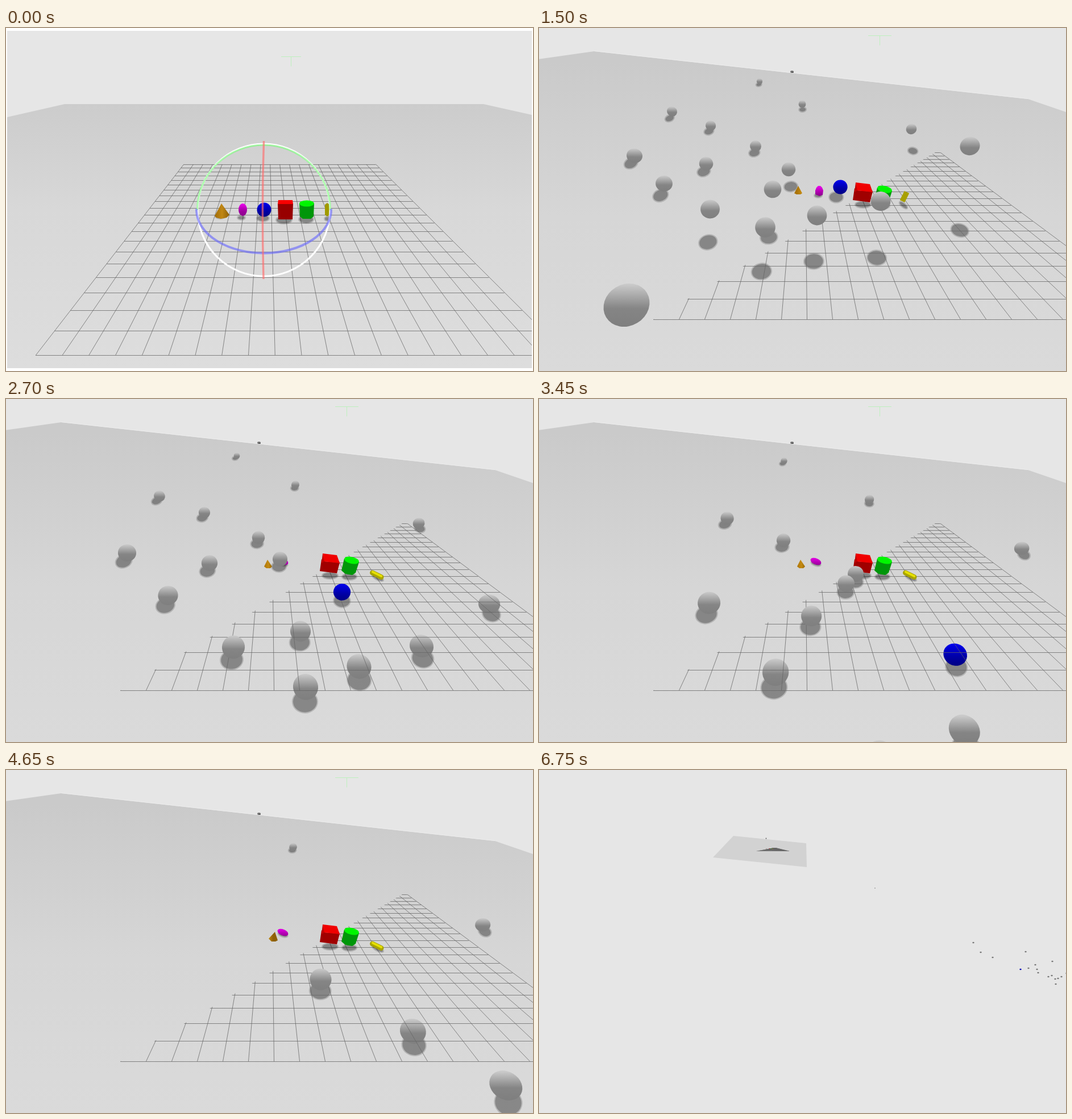
An HTML page with a canvas that plays this animation: 927x604 px, repeating every 6.9 s.

```html
<!DOCTYPE html>
<html lang="en">
<head>
<meta charset="utf-8">
<title>Rolling balls</title>
<style>
html, body { margin: 0; width: 100%; height: 100%; overflow: hidden; background: #e6e6e6; }
canvas { display: block; }
</style>
</head>
<body>
<canvas id="stage" width="927" height="604"></canvas>
<script>
const ctx = document.getElementById('stage').getContext('2d');
const LOOP = 6900, STEP = 150, SKY = '#e6e6e6';
const GRAY = ['#cacaca', '#858585', '#7f7f7f'];
const BLUE = ['#0000f0', '#0000a8', '#000084'];

// Per ball: drop point, two points on its rolling path, radius, optional deflection.
const BALLS = [
  [388, 94, 406, 100, 431, 109, 5.3],
  [463, 134, 509, 151, 581, 177, 7, 34, 15],
  [234, 147, 270, 171, 331, 210, 9.5, 18, 28],
  [302, 172, 349, 200, 430, 249, 10, 10, 44],
  [381, 208, 444, 244, 557, 308, 11.3],
  [168, 225, 213, 271, 299, 359, 15],
  [294, 239, 358, 289, 479, 382, 14],
  [439, 249, 482, 282, 540, 325, 13, 120, 68],
  [655, 178, 726, 219, 849, 263, 9.7],
  [758, 208, 850, 361, 1109, 477, 16.5],
  [220, 274, 285, 346, 416, 481, 17],
  [411, 284, 518, 409, 748, 583, 18],
  [301, 319, 400, 437, 601, 633, 20],
  [489, 330, 621, 471, 913, 693, 21],
  [398, 351, 527, 507, 815, 768, 22],
  [601, 305, 731, 435, 1025, 608, 19.5],
  [154, 488, 300, 720, 730, 1180, 42],
  [530, 280, 591, 340, 732, 450, 14.8]
];
// Distant balls after the camera has pulled back; the first is the blue one.
const DOTS = [[847, 351], [764, 304], [777, 321], [798, 330], [856, 320], [861, 349],
  [873, 343], [876, 351], [878, 357], [896, 364], [902, 362], [908, 368], [913, 367],
  [919, 364], [903, 337], [909, 377], [928, 358], [591, 208]];

const clamp = (x, lo = 0, hi = 1) => Math.min(hi, Math.max(lo, x));

function poly(fill, ...pts) {
  ctx.fillStyle = fill;
  ctx.beginPath();
  for (let i = 0; i < pts.length; i += 2) ctx.lineTo(pts[i], pts[i + 1]);
  ctx.closePath();
  ctx.fill();
}

function blob(fill, x, y, rx, ry = rx, rot = 0) {
  ctx.fillStyle = fill;
  ctx.beginPath();
  ctx.ellipse(x, y, rx, ry, rot, 0, 2 * Math.PI);
  ctx.fill();
}

function line(color, width, x1, y1, x2, y2) {
  ctx.strokeStyle = color;
  ctx.lineWidth = width;
  ctx.beginPath();
  ctx.moveTo(x1, y1);
  ctx.lineTo(x2, y2);
  ctx.stroke();
}

function fade(x1, y1, x2, y2, ...stops) {
  const g = ctx.createLinearGradient(x1, y1, x2, y2);
  for (let i = 0; i < stops.length; i += 2) g.addColorStop(stops[i], stops[i + 1]);
  return g;
}

// Two layers give the soft rim.
function shadow(x, y, rx, ry, rot = 0) {
  blob('rgba(0,0,0,.16)', x, y, rx + 1, ry + 1, rot);
  blob('rgba(0,0,0,.26)', x, y, rx - 1, ry - 1, rot);
}

function sphere(x, y, r, [top, mid, low]) {
  const stretch = Math.hypot(1, Math.hypot(x - 463, y - 302) / 650);
  const fill = fade(0, y - r, 0, y + r, 0, top, .58, mid, 1, low);
  blob(fill, x, y, r * stretch, r, Math.atan2(y - 302, x - 463));
}

// 20 x 20 floor grid in one-point perspective; lines stay one pixel wide at any zoom.
function grid(vx, vy, x0, y0, cell, step) {
  const k = 1 + 20 * step, dy = y0 - vy, x1 = x0 + 20 * cell;
  ctx.beginPath();
  for (let i = 0; i <= 20; i++) {
    const d = 1 + i * step, y = Math.round(vy + dy / d) + .5, x = x0 + i * cell + .5;
    ctx.moveTo(vx + (x0 - vx) / d, y);
    ctx.lineTo(vx + (x1 - vx) / d, y);
    ctx.moveTo(x, y0);
    ctx.lineTo(vx + (x - vx) / k, vy + dy / k);
  }
  ctx.save();
  ctx.setTransform(1, 0, 0, 1, 0, 0);
  ctx.strokeStyle = 'rgba(100,100,100,.75)';
  ctx.lineWidth = 1;
  ctx.stroke();
  ctx.restore();
}

function lamp(x, y, w) {
  line('#bdf0bd', 1, x - w, y, x + w, y);
  line('#bdf0bd', 1, x, y, x, y + 17);
}

function arc(color, width, x, y, rx, ry, from, to) {
  ctx.strokeStyle = color;
  ctx.lineWidth = width;
  ctx.beginPath();
  ctx.ellipse(x, y, rx, ry, 0, from, to);
  ctx.stroke();
}

function intro() {
  ctx.fillStyle = '#fff';
  ctx.fillRect(0, 0, 927, 604);
  ctx.save();
  ctx.beginPath();
  ctx.rect(2, 5, 923, 594);
  ctx.clip();
  ctx.fillStyle = SKY;
  ctx.fillRect(0, 0, 927, 604);
  poly(fade(0, 134, 0, 600, 0, '#cccccc', .4, '#d8d8d8', 1, '#dddddd'),
    2, 157, 103, 134, 840, 134, 925, 153, 925, 600, 2, 600);
  lamp(501.5, 50.5, 17.5);
  grid(460, 50, 52, 576, 46.75, .0884);

  shadow(377, 332, 9, 4);
  shadow(414, 334, 7, 4);
  shadow(452, 335, 11, 6);
  shadow(489, 338, 14, 7);
  shadow(528, 337, 13, 7);
  shadow(565, 336, 5, 4);
  poly(fade(367, 0, 393, 0, 0, '#a06c08', .5, '#c08714', 1, '#8e6008'),
    379, 309, 393, 329, 388, 334, 378, 336, 370, 334, 367, 331);
  blob(fade(0, 309, 0, 331, 0, '#f000f0', .6, '#a000a0', 1, '#8c008c'), 416.5, 320, 7.5, 11);
  sphere(454, 320, 12.5, BLUE);
  poly('#980000', 478, 309, 505, 309, 504, 337, 479, 337);
  poly('#f80000', 479, 303, 504, 303, 505, 310, 478, 310);
  poly('#00960a', 516, 309, 542, 309, 541, 332, 536, 336, 522, 336, 517, 332);
  blob('#00f500', 529, 309, 12.8, 5.5);
  poly('#a09a00', 561, 311, 565, 308, 569, 311, 569, 329, 565, 332, 561, 329);

  arc('#fff', 3, 453.5, 320.5, 116.5, 116.5, 0, 2 * Math.PI);
  arc('rgba(110,255,110,.55)', 3, 453.5, 320.5, 117, 114.5, Math.PI, 2 * Math.PI);
  arc('rgba(100,100,255,.6)', 4, 453.5, 320, 118.5, 76.5, -.02, Math.PI + .02);
  ctx.strokeStyle = 'rgba(255,110,110,.65)';
  ctx.lineWidth = 3.5;
  ctx.beginPath();
  ctx.moveTo(453.5, 199);
  ctx.quadraticCurveTo(449.5, 320, 453, 442);
  ctx.stroke();
  ctx.restore();
}

// Constant acceleration on the slope, seen in perspective, preceded by a free fall.
function ballAt([x2, y2, x3, y3, x4, y4, r3, kx = 0, ky = 0], v) {
  const near = .0027 * r3, w = s => s / (1 - near * s);
  const s = Math.max(0, (v - 1500) / 1000) ** 2;
  if (near * s > .9) return null;
  const span = w(3.8) - w(1.44);
  const gx = (x4 - x3) / span, gy = (y4 - y3) / span;
  const px = x3 - gx * w(1.44), py = y3 - gy * w(1.44);
  const kick = Math.max(0, s - 3.8) / 6.12;
  const x = px + gx * w(s) + kx * kick, y = py + gy * w(s) + ky * kick;
  const drop = 25 * r3 * (((v - 1200) / 1000) ** 2 - .09);
  const q = clamp(1 - drop / Math.max(Math.abs(py - y2), 6));
  const rise = Math.max(0, -drop);
  const lift = Math.max(0, (py - y2) * q + rise);
  const r = r3 * (y + 28) / (y3 + 28) * (1 + .0015 * lift);
  const ox = (x2 - px) * q;
  return {
    x: x + ox, y: y + (y2 - py) * q - rise, r, lift,
    sx: x + ox / 2 + (x - 600) * .015,
    sy: y + r * (.75 + y / 1200) + Math.min(.8 * lift, 38)
  };
}

function props(v) {
  const fallen = v > 1900;
  shadow(570, 311, 14, 6);
  shadow(604, 313, 13, 6);
  if (fallen) {
    shadow(654, 315, 11, 4, .45);
    shadow(487, 290, 9, 4, .3);
  } else {
    shadow(641, 312, 9, 4, .7);
    shadow(491, 295, 7, 4);
  }

  const cone = fade(453, 0, 470, 0, 0, '#a87208', .5, '#c48a12', 1, '#8e6008');
  if (v > 4200) poly(cone, 473, 285, 478, 300, 474, 302, 467, 302, 462, 297);
  else if (fallen) poly(cone, 460, 283, 468, 295, 465, 298, 458, 298, 454, 295);
  else poly(cone, 456, 278, 463, 291, 460, 293, 453, 293, 449, 291);

  const egg = fade(0, 278, 0, 295, 0, '#f000f0', .6, '#b000b0', 1, '#8c008c');
  if (fallen) blob(egg, 487, 286, 10, 5.5, .38);
  else poly(egg, 486, 293, 486, 286, 488, 281, 491, 278, 495, 278, 498, 281, 500, 286, 499, 294, 493, 296);

  poly('#a00000', 555, 282, 560, 286, 587, 288, 582, 307, 552, 303);
  poly('#f00000', 557, 272, 582, 275, 587, 289, 559, 286);
  poly('#c00000', 557, 272, 560, 286, 555, 289);

  poly('#00960a', 595, 281, 621, 287, 615, 306, 609, 310, 597, 308, 590, 302);
  blob('#00f500', 608, 284, 13, 6, .22);

  ctx.lineCap = fallen ? 'round' : 'butt';
  if (fallen) {
    line('#a8a400', 9, 644.5, 306, 660, 313.5);
    line('#e6e000', 4, 645, 304.5, 660, 312);
  } else {
    line('#a8a000', 9.5, 647, 289, 639, 305);
  }
  ctx.lineCap = 'butt';
}

function scene(t) {
  // The first run plays at double speed and is cut short by a restart.
  const v = t < 1200 ? 2930 + (t - 900) * 2 : t;
  const u = clamp((t - 5250) / 1050);
  const zx = .0645 ** u, zy = .0205 ** u, far = 1 - (zx - .0645) / .9355;
  const to = (a, b) => a + (b - a) * far;

  ctx.fillStyle = SKY;
  ctx.fillRect(0, 0, 927, 604);
  const floor = u < 1 ? fade(0, to(60, 116), 0, 604, 0, '#cacaca', .5, '#d6d6d6', 1, '#dadada') : '#d2d2d2';
  poly(floor, to(97, 342), to(41, 116), to(860, 470), to(125, 129),
    to(1900, 471), to(482, 171), to(1900, 471), to(1500, 171),
    to(-1500, 306), to(1500, 154), to(-1500, 306), to(268, 154));
  if (!u) line('#ececec', 1, 97, 40.5, 860, 124.5);

  ctx.save();
  ctx.setTransform(zx, 0, 0, zy, 369 * far, 132.5 * far);
  lamp(599.5, 13.5, 20.5);
  if (!u) {
    blob('#777', 445, 77, 3, 2);
    blob('#555', 446, 78, 2, 1);
  }

  const balls = zx < .4 ? [] : BALLS.map((row, i) => {
    const b = ballAt(row, v);
    return b && { ...b, tint: i === BALLS.length - 1 ? BLUE : GRAY };
  }).filter(b => b && b.y < 700 && b.x < 1000);
  balls.sort((a, b) => a.y - b.y);
  for (const b of balls) shadow(b.sx, b.sy, b.r, b.r * Math.min(.95, .6 + b.y * .0006), (b.sx - 520) * .0013);

  // Balls resting below the grid plane are seen through its lines.
  const under = b => b.lift < 2 && b.x - 201 - (513 - b.y) * 1.693 > 120;
  const paint = b => sphere(b.x, b.y, b.r, b.tint);
  balls.filter(under).forEach(paint);

  ctx.save();
  ctx.beginPath();
  ctx.moveTo(198, 515);
  ctx.lineTo(697, 219);
  ctx.lineTo(1200, 219);
  ctx.lineTo(1200, 515);
  ctx.clip();
  grid(466, 41, 201, 513, 45, .0825);
  ctx.restore();

  props(v);
  balls.filter(b => !under(b)).forEach(paint);
  ctx.restore();

  if (zx < .4) {
    const grow = zx / .0645, back = (t - 6750) / 450;
    DOTS.forEach(([x, y], i) => {
      const last = i === DOTS.length - 1;
      const size = Math.min(grow, 4) * (last ? .8 : 1.7);
      blob(i ? '#777' : '#0000b4', 398 + (x + 16 * back - 398) * grow,
        140 + (y + 6 * back - 140) * grow, size, size * .8);
    });
    if (u === 1) blob('#555', 399.5, 120.5, .9);
  }
}

let shown = -1;
function draw() {
  const t = Math.floor(performance.now() % LOOP / STEP) * STEP;
  if (t !== shown) {
    shown = t;
    if (t < STEP) intro();
    else scene(t);
  }
  requestAnimationFrame(draw);
}
draw();
</script>
</body>
</html>
```
